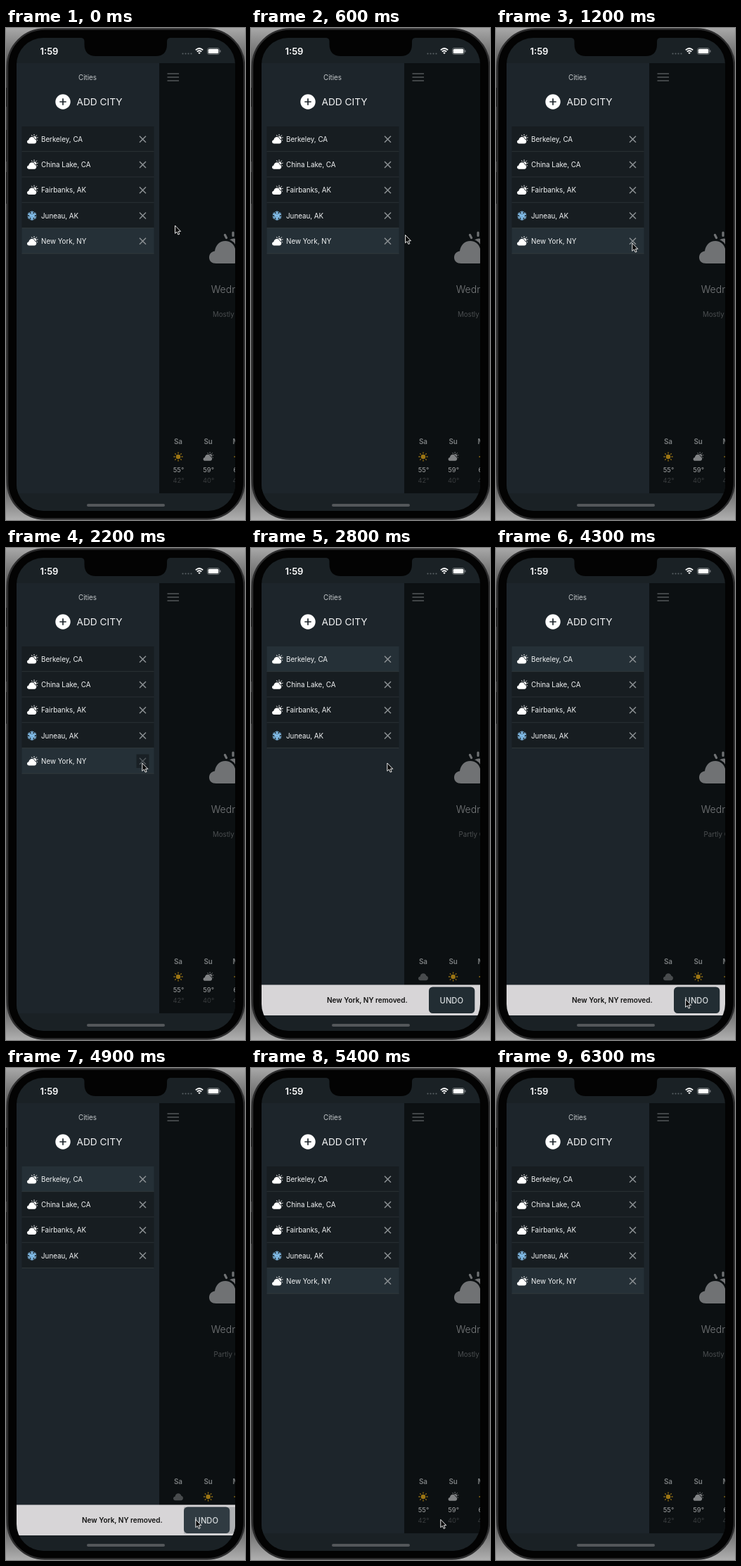
Animation, 340 px wide and 700 px high, one loop 7000 ms. Source, as an HTML page:

```html
<!DOCTYPE html>
<html lang="en">
<head>
<meta charset="utf-8">
<title>Weather cities</title>
<style>
  html, body { margin: 0; width: 100%; height: 100%; overflow: hidden; background: #111; }
  svg { display: block; width: 100vw; height: 100vh; }
  text { font-family: Inter, "Noto Sans", sans-serif; }
  .mid { text-anchor: middle; }
  .row { font-size: 9.8px; fill: #f1f3f4; }
  .day { font-size: 9.8px; font-weight: 600; fill: #7d8082; }
  .high { font-size: 9.4px; fill: #a0a2a3; }
  .low { font-size: 9.4px; fill: #3a3d3f; }
</style>
</head>
<body>
<svg viewBox="0 0 340 700" xmlns="http://www.w3.org/2000/svg">
  <defs>
    <linearGradient id="back" x2="0" y2="1">
      <stop offset="0" stop-color="#a8a8a8"/>
      <stop offset=".09" stop-color="#484848"/>
      <stop offset=".9" stop-color="#3c3c3c"/>
      <stop offset="1" stop-color="#b0b0b0"/>
    </linearGradient>
    <clipPath id="screen"><rect x="15" y="14" width="311" height="673" rx="38"/></clipPath>
    <path id="cloud" d="M10 44C4 44 0 40.5 0 35.5C0 30.5 3.5 27 8 26.5C9 18 15 12 23 12C30 12 35 16 37 23C42 24 45 28 45 33C45 39.5 41 44 35 44Z"/>
    <mask id="behind" maskUnits="userSpaceOnUse" x="-5" y="-5" width="65" height="55">
      <rect x="-5" y="-5" width="65" height="55" fill="#fff"/>
      <use href="#cloud" stroke="#000" stroke-width="5"/>
    </mask>
    <g id="partly">
      <use href="#cloud" fill="currentColor"/>
      <g mask="url(#behind)">
        <circle cx="35" cy="18" r="9.5" fill="currentColor"/>
        <path d="M22.5 3.5L24.5 7.5M34 0V4.5M46 4L43 7.5M51.5 15L47 16M50 28L46.500 26" stroke="currentColor" stroke-width="3.2" stroke-linecap="round"/>
      </g>
    </g>
    <g id="sun" stroke="currentColor" stroke-width="1.3" stroke-linecap="round">
      <circle r="3.3" fill="currentColor" stroke="none"/>
      <path d="M0-6.100V-5M0 6.100V5M-6.100 0H-5M6.100 0H5M-4.300-4.300L-3.600-3.600M4.300-4.300L3.600-3.600M-4.300 4.300L-3.600 3.600M4.300 4.300L3.600 3.600"/>
    </g>
    <path id="arm" d="M0 0V-6.400M-2-5.700L0-3.900L2-5.700M-1.600-3.200L0-1.700L1.600-3.200"/>
    <g id="snow" fill="none" stroke="#8ccbfa" stroke-width="1.050" stroke-linecap="round"></g>
  </defs>

  <rect width="340" height="700" fill="url(#back)"/>
  <path d="M.5 85V112M.5 145V190M.5 205V250M339.500 165V235" stroke="#161616"/>
  <rect x="2" y="1.500" width="337" height="697" rx="53" fill="#030303" stroke="#2d2d2e" stroke-width="2.500"/>
  <rect x="4.500" y="4" width="332" height="692" rx="50" fill="#030303"/>

  <g clip-path="url(#screen)">
    <rect x="15" y="14" width="311" height="673" fill="#1a2125"/>
    <rect x="218" y="50" width="108" height="612" fill="#0c1012"/>
    <path d="M229.500 65H246M229.500 70H246M229.500 75H246" stroke="#414547" stroke-width="1.900"/>
    <use href="#partly" transform="translate(289 291)" color="#707274"/>
    <text x="291.800" y="376.500" font-size="14" font-weight="300" fill="#7b7d7f">Wednesday</text>
    <text id="sky" y="410.500" font-size="9.700" fill="#4b4e50"></text>
    <g id="forecast"></g>

    <rect x="15" y="50" width="203" height="612" fill="#1d252b"/>
    <text class="mid" x="116" y="73.500" font-size="9.800" fill="#c5c9cb">Cities</text>
    <circle cx="81" cy="105" r="10.700" fill="#fff"/>
    <path d="M76.300 105H85.700M81 100.300V109.700" stroke="#1d252b" stroke-width="1.700"/>
    <text x="100.500" y="110" font-size="13.700" fill="#f4f5f6">ADD CITY</text>
    <g id="rows"></g>

    <g id="toast">
      <rect x="15" y="621.500" width="311" height="43.500" fill="#d7d5d7"/>
      <text x="108" y="647.300" font-size="10" font-weight="600" fill="#111">New York, NY removed.</text>
      <rect id="focus" x="253" y="624.500" width="73" height="38" fill="#aeb0b2"/>
      <rect id="undo" x="253" y="624.500" width="65.300" height="37.500" rx="5.500"/>
      <text class="mid" x="285.300" y="647.500" font-size="11.200" font-weight="500" fill="#d9dddf">UNDO</text>
    </g>

    <text x="48.500" y="37.500" font-size="13" font-weight="600" fill="#fff">1:59</text>
    <path d="M251.500 36.500H265" stroke="#596064" stroke-width="2.200" stroke-linecap="round" stroke-dasharray="0 4"/>
    <g fill="none" stroke="#fff" stroke-width="1.700">
      <path d="M269.800 31.300Q275 26.700 280.200 31.300M271.800 33.700Q275 30.800 278.200 33.700"/>
      <path d="M273.200 35L275 37.300L276.800 35Q275 33.800 273.200 35Z" fill="#fff" stroke="none"/>
    </g>
    <rect x="286.500" y="28.500" width="17" height="9" rx="2.600" fill="none" stroke="#7d8285" stroke-width=".8"/>
    <rect x="287.700" y="29.700" width="14.600" height="6.600" rx="1.600" fill="#fff"/>
    <path d="M304.800 31.500V34.500" stroke="#7d8285" stroke-width="1.200"/>
    <rect x="115" y="677" width="111" height="4" rx="2" fill="#53575a"/>
  </g>
  <path d="M107 14Q111.500 14.500 111.500 19V23Q111.500 40 128 40H213Q229 40 229 23V19Q229 14.500 233.500 14Z" fill="#030303"/>

  <g id="ring" fill="none">
    <circle r="15.800" stroke="#0a0a0a" stroke-width="2.400"/>
    <circle r="16.900" stroke="#8a8f92" stroke-width=".5"/>
  </g>
  <path id="cursor" d="M0 0V11.300L2.600 9L4.400 13L6.300 12.200L4.600 8.300H8Z" fill="#0a0a0a" stroke="#fff" stroke-width=".9" stroke-linejoin="round"/>
</svg>
<script>
const LOOP = 7000, STEP = 100;
const $ = id => document.getElementById(id);
const show = (el, on) => el.setAttribute('visibility', on ? 'inherit' : 'hidden');
const within = (t, a, b) => t >= a && t < b;

// time, x, y of the pointer tip
const path = [
  [300, 240.5, 281], [400, 236, 283], [500, 229, 287], [700, 210, 302],
  [800, 201, 308], [900, 194.5, 310.5], [1000, 191.7, 308.5], [1200, 193.8, 306],
  [2800, 193.8, 306], [2900, 198, 325], [3000, 209, 378], [3200, 239, 515],
  [3300, 247.6, 557.6], [3400, 247.6, 557.6], [3500, 254, 588], [3600, 259.3, 604],
  [3700, 262, 610.5], [3800, 263.7, 613.7], [3900, 263.7, 613.7], [4200, 269, 638.5],
  [4300, 269.6, 642], [4500, 269.8, 642.4], [6100, 269.8, 642.4], [6200, 268.9, 628]
];

function pointer(t) {
  const i = path.findIndex(p => p[0] >= t);
  if (i < 0) return path[path.length - 1].slice(1);
  if (i === 0) return path[0].slice(1);
  const [t0, x0, y0] = path[i - 1], [t1, x1, y1] = path[i];
  const k = (t - t0) / (t1 - t0);
  return [x0 + (x1 - x0) * k, y0 + (y1 - y0) * k];
}

const cities = ['Berkeley, CA', 'China Lake, CA', 'Fairbanks, AK', 'Juneau, AK', 'New York, NY'];
const ROW = 36.25;

$('snow').innerHTML = [0, 60, 120, 180, 240, 300]
  .map(a => `<use href="#arm" transform="rotate(${a})"/>`).join('');

$('rows').innerHTML = cities.map((name, i) => {
  const icon = i === 3
    ? '<use href="#snow" transform="translate(37 18.3)"/>'
    : '<use href="#partly" transform="translate(30 11.5) scale(.295)" color="#fff"/>';
  return `<g transform="translate(0 ${140 + i * ROW})">
    <rect class="fill" x="22.5" width="188" height="${ROW}"/>
    <rect x="22.5" y="${ROW - .9}" width="188" height=".9" fill="#32393d"/>
    ${icon}<text class="row" x="50" y="21.8">${name}</text>
    <rect class="press" x="185.5" y="8.5" width="18" height="19.5" fill="#192025"/>
    <path class="cross" d="M190 13.700L199 22.700M199 13.700L190 22.700" stroke-width="1.5"/></g>`;
}).join('');
const rows = [...$('rows').children];

const sun = x => `<use href="#sun" transform="translate(${x} 610)" color="#9c7513"/>`;
const partly = x => `<use href="#partly" transform="translate(${x - 7} 603.5) scale(.28)" color="#808284"/>`;
const overcast = x => `<use href="#cloud" transform="translate(${x - 7} 601.5) scale(.31)" fill="#484b4d"/>`;
const days = [['Sa', 245, 55, 42], ['Su', 287.6, 59, 40], ['Mo', 330, 61, 44]];
const label = (cls, x, y, s) => `<text class="mid ${cls}" x="${x}" y="${y}">${s}</text>`;

$('forecast').innerHTML = days.map(([day, x, high, low]) =>
  label('day', x, 592.3, day) + label('high', x + .5, 632, high + '°') + label('low', x + .5, 646.5, low + '°')
).join('') +
  `<g id="before">${sun(245)}${partly(287.6)}${sun(331)}</g>` +
  `<g id="after">${overcast(245)}${sun(287.6)}${sun(331)}</g>`;

function draw(now) {
  const t = Math.floor(now % LOOP / STEP) * STEP;
  const removed = within(t, 2800, 5400);
  const closing = within(t, 2000, 2800);
  const undoing = within(t, 4700, 5400);
  const [x, y] = pointer(t);

  rows.forEach((row, i) => {
    const last = i === cities.length - 1;
    const active = removed ? i === 0 : last;
    const pressed = last && closing;
    show(row, !(last && removed));
    row.querySelector('.fill').setAttribute('fill', active ? '#253037' : '#171d21');
    row.querySelector('.cross').setAttribute('stroke', pressed ? '#51585c' : '#8b9093');
    show(row.querySelector('.press'), pressed);
  });

  $('sky').textContent = removed ? 'Partly Cloudy' : 'Mostly Cloudy';
  $('sky').setAttribute('x', removed ? 295.5 : 294);
  show($('before'), !removed);
  show($('after'), removed);

  show($('toast'), removed);
  show($('focus'), undoing);
  $('undo').setAttribute('fill', undoing ? '#303b42' : '#222d33');

  const place = `translate(${x} ${y})`;
  $('cursor').setAttribute('transform', place);
  $('ring').setAttribute('transform', place);
  show($('cursor'), t < 6300);
  show($('ring'), within(t, 2000, 2200) || within(t, 4700, 4900));
}

const start = performance.now();
function tick() {
  draw(performance.now() - start);
  requestAnimationFrame(tick);
}
tick();
</script>
</body>
</html>
```
